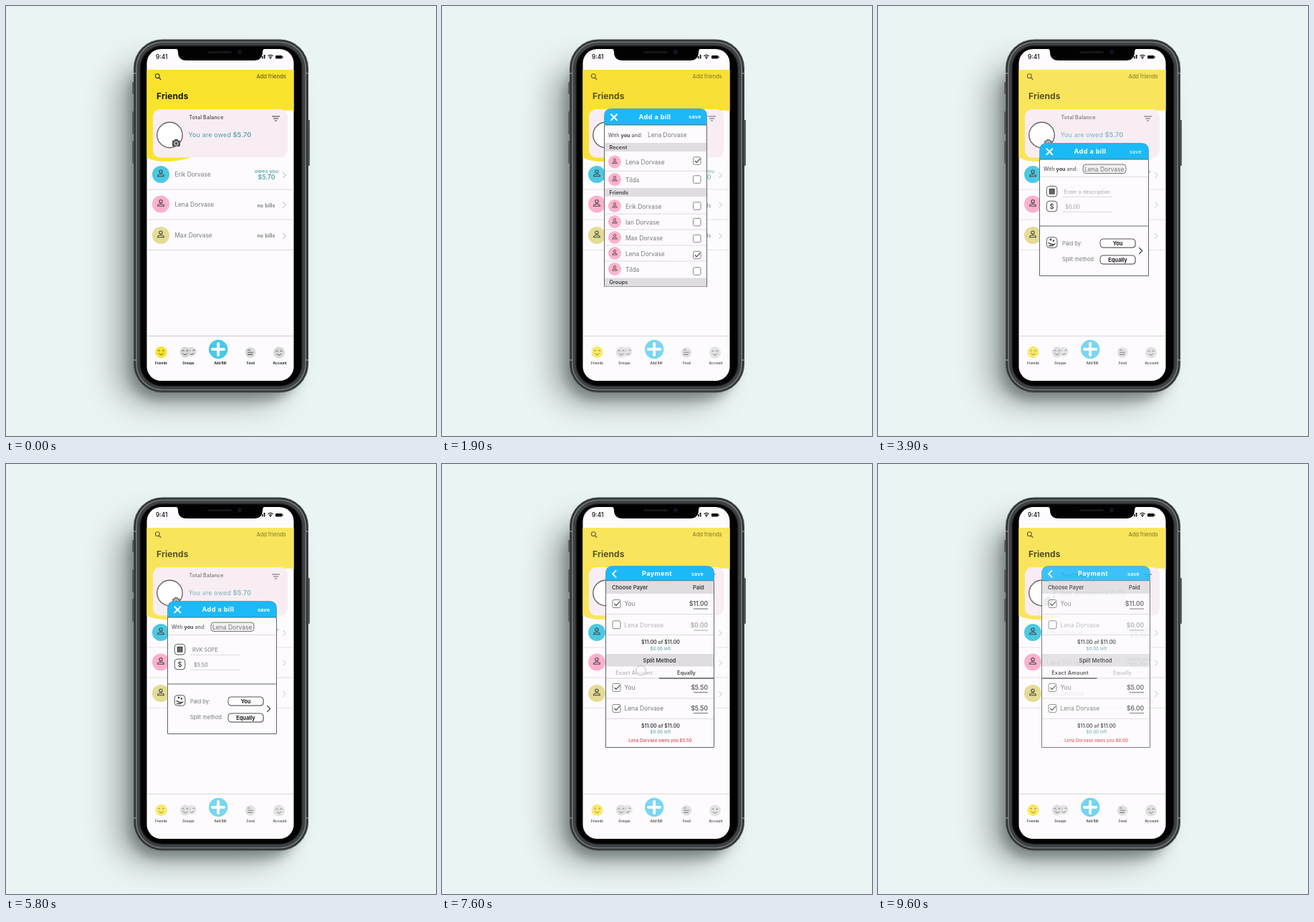
These frames come from a looping animation (600 by 600 pixels, 9700 ms). An HTML page:

```html
<!DOCTYPE html>
<html lang="en">
<head>
<meta charset="utf-8">
<title>Split a bill</title>
<style>
html, body { margin: 0; height: 100%; overflow: hidden; background: #eaf4f2; }
svg { display: block; width: 100vw; height: 100vh; font-family: Inter, sans-serif; }
.anim, .tap { animation: 9.7s linear infinite both; }
.dim { animation-name: dim; }
.sun { animation-name: sun; }
.before { animation-name: before; }
.after { animation-name: after; }
.pops { isolation: isolate; }
.pop { mix-blend-mode: plus-lighter; }
.pick { animation-name: pick; }
.bill { animation-name: bill; }
.pay { animation-name: pay; }
.checked { animation-name: checked; }
.empty { animation-name: empty; }
.typed { animation-name: typed; }
.equal { animation-name: equal; }
.exact { animation-name: exact; }
.tap { animation-name: tap; opacity: 0; }
.tap.long { animation-name: tapLong; }

@keyframes dim { 0%, 4.12% { opacity: 1 } 11.34%, 97.94% { opacity: .72 } 100% { opacity: .8 } }
@keyframes sun {
  0%, 4.12% { fill: #fae32c } 11.34%, 30.93% { fill: #f8e036 }
  38.14%, 100% { fill: #f9e55c }
}
@keyframes before { 0%, 69% { opacity: 1 } 69.01%, 100% { opacity: 0 } }
@keyframes after { 0%, 69% { opacity: 0 } 69.01%, 100% { opacity: 1 } }
@keyframes pick { 0%, 4.12% { opacity: 0 } 11.34%, 30.93% { opacity: 1 } 38.14%, 100% { opacity: 0 } }
@keyframes bill { 0%, 30.93% { opacity: 0 } 38.14%, 64.95% { opacity: 1 } 72.16%, 100% { opacity: 0 } }
@keyframes pay { 0%, 64.95% { opacity: 0 } 72.16%, 97.94% { opacity: 1 } 100% { opacity: .71 } }
@keyframes checked { 0%, 16% { opacity: 0 } 19.5%, 100% { opacity: 1 } }
@keyframes empty { 0%, 52% { opacity: 1 } 56.7%, 100% { opacity: 0 } }
@keyframes typed { 0%, 52% { opacity: 0 } 56.7%, 100% { opacity: 1 } }
@keyframes equal { 0%, 78% { opacity: 1 } 84.54%, 100% { opacity: 0 } }
@keyframes exact { 0%, 78% { opacity: 0 } 84.54%, 100% { opacity: 1 } }
@keyframes tap { 0% { opacity: 0 } 2%, 3.2% { opacity: .9 } 4.7%, 100% { opacity: 0 } }
@keyframes tapLong { 0% { opacity: 0 } 2%, 4.1% { opacity: .9 } 6.7%, 100% { opacity: 0 } }
</style>
</head>
<body>
<svg id="stage" viewBox="0 0 600 600"></svg>
<script>
const ERIK = 'Erik Dorvase', LENA = 'Lena Dorvase', MAX = 'Max Dorvase',
      IAN = 'Ian Dorvase', TILDA = 'Tilda';
const BLUE = '#1cb9f8', TEAL = '#62a9ae', PINK = '#fdb3cc', INK = '#3c3c3e', GREY = '#777';

const text = (x, y, s, size, fill = GREY, weight = 400, anchor = 'start', gap = 0) =>
  `<text x="${x}" y="${y}" font-size="${size}" fill="${fill}" font-weight="${weight}" text-anchor="${anchor}" letter-spacing="${gap}">${s}</text>`;
const mid = (x, y, s, size, fill, weight = 600, gap = 0) => text(x, y, s, size, fill, weight, 'middle', gap);
const rect = (x, y, w, h, r, fill, extra = '') =>
  `<rect x="${x}" y="${y}" width="${w}" height="${h}" rx="${r}" fill="${fill}" ${extra}/>`;
const circle = (x, y, r, fill, extra = '') => `<circle cx="${x}" cy="${y}" r="${r}" fill="${fill}" ${extra}/>`;
const path = (d, stroke, w = 1, extra = '') =>
  `<path d="${d}" fill="none" stroke="${stroke}" stroke-width="${w}" ${extra}/>`;
const rule = (x1, x2, y, stroke = '#dcdadd', w = 1) => path(`M${x1} ${y}H${x2}`, stroke, w);
const group = (cls, ...parts) => `<g class="${cls}">${parts.join('')}</g>`;
const anim = (cls, ...parts) => group('anim ' + cls, ...parts);

const person = (x, y, r, fill) => circle(x, y, r, fill) +
  `<g transform="translate(${x} ${y}) scale(${r / 12})">` +
  circle(0, -3.8, 2.2, 'none', 'stroke="#44464a" stroke-width="1.1"') +
  path('M-4.4 2.8V1.8Q-4 0 0 0T4.4 1.8V2.8Z', '#44464a', 1.1) + '</g>';
const tick = (x, y) => path(`M${x - 3} ${y}l2.4 2.4l5.2-5.6`, '#444', 1.1);
const box = (x, y, s, on) =>
  rect(x - s / 2, y - s / 2, s, s, 2, '#fff', 'stroke="#777" stroke-width=".9"') + (on ? tick(x, y) : '');
const arrow = (x, y, h, stroke, w = 1) => path(`M${x} ${y - h}l${h} ${h}l${-h} ${h}`, stroke, w);
const cross = (x, y) => path(`M${x - 4} ${y - 4}l8 8m0-8l-8 8`, '#fff', 2, 'stroke-linecap="round"');
const face = (x, y, r, fill) => circle(x, y, r, fill) +
  path(`M${x - 4.5} ${y - 1.5}q1.5-2.4 3 0m3 0q1.5-2.4 3 0M${x - 3} ${y + 1.5}q3 4.4 6 0`, '#444', .9);

function phone() {
  const key = (x, y, h) => rect(x, y, 3, h, 1, '#4a4c4e');
  const ring = (inset, fill) =>
    rect(178 + inset, 46.5 + inset, 244 - 2 * inset, 493 - 2 * inset, 40 - inset, fill);
  const rings = [[0, '#4a4d4f'], [1.2, '#2d2f31'], [3, '#76797b'], [4.6, '#3f4244'], [8.5, '#1c1d1e'], [10, '#020203']];
  return `<defs>
    <filter id="soft" x="-50%" y="-30%" width="200%" height="160%"><feGaussianBlur stdDeviation="20"/></filter>
    <filter id="near" x="-30%" y="-30%" width="160%" height="160%"><feGaussianBlur stdDeviation="8"/></filter>
    <clipPath id="glass"><rect x="196.5" y="60" width="205" height="463" rx="20"/></clipPath></defs>` +
    rect(0, 0, 600, 600, 0, '#eaf4f2') +
    rect(152, 80, 238, 477, 45, '#5d6665', 'opacity=".5" filter="url(#soft)"') +
    rect(172, 82, 236, 468, 42, '#4a5251', 'opacity=".5" filter="url(#near)"') +
    key(176.5, 106, 17) + key(176.5, 147, 32) + key(176.5, 188, 32) + key(420.8, 159, 64) +
    rings.map(([inset, fill]) => ring(inset, fill)).join('') +
    path('M178 94h4m236 0h4M178 494h4m236 0h4', '#8a8c8d', 1.5) +
    rect(196.5, 60, 205, 463, 20, '#fdfbfe');
}

function status() {
  return text(209, 74, '9:41', 8.4, '#111', 500) +
    rect(357, 70, 1.5, 3.5, 0, '#111') + rect(359.7, 68, 1.8, 5.5, 0, '#111') +
    path('M365.5 69.8q3.5-3 7 0M367 71.6q2-1.6 4 0', '#111', 1.3) + circle(369, 73, .9, '#111') +
    rect(376, 69, 9.5, 4.5, 1.2, '#111') + rect(386, 70.4, 1, 1.8, .4, '#111') +
    '<path d="M236 59H362Q358 60 358 64Q358 76 346 76H252Q240 76 240 64Q240 60 236 59Z" fill="#020203"/>' +
    rect(281, 63, 34, 3, 1.5, '#151618') + circle(326, 64.5, 3.4, '#0d0f17') + circle(326, 64.5, 1.5, '#171c2c');
}

const owes = (y, sum) => mid(363.5, y, 'owes you', 7.2, TEAL) + mid(363.5, y + 9.5, sum, 8.5, TEAL, 700);
const noBills = y => mid(363, y, 'no bills', 7.1, GREY, 600, .1);
const balance = sum => text(254.5, 183, `You are owed <tspan font-weight="700">${sum}</tspan>`, 8.8, TEAL, 500, 'start', .22);

function home() {
  const people = [[ERIK, 235, '#4cc9e2'], [LENA, 276.5, '#fcb0cb'], [MAX, 320, '#e5dc94']];
  const labels = [[216.5, 'Friends'], [254.5, 'Groups'], [299, 'Add Bill'], [341.5, 'Feed'], [382, 'Account']];
  return '<path class="anim sun" d="M196 89H402V147Q390 143 380 150L276 205Q246 217 224 217Q205 217 196 211Z"/>' +
    rect(205, 144, 188, 67.5, 10, '#f8edf3') +
    circle(228.5, 180, 17.7, '#fff', 'stroke="#666" stroke-width="1.4"') +
    anim('dim',
      circle(211.3, 97.7, 2.9, 'none', 'stroke="#333" stroke-width="1.1"'), path('M213.5 100l2.7 2.7', '#333', 1.3),
      text(349.5, 101, 'Add friends', 7.4, '#665f22', 500),
      text(210, 129.8, 'Friends', 12, '#1b1a16', 700, 'start', .1),
      rect(232, 187.5, 11, 8.5, 1.5, '#555'), rect(235, 185.8, 5, 3, 1, '#555'),
      circle(237.5, 191.8, 2.6, '#555', 'stroke="#f8edf3"'),
      text(255.5, 157.7, 'Total Balance', 7.1, '#555', 600, 'start', .15),
      path('M371 154h11M373 157h7M375 160h3', '#333', 1.2),
      anim('before', balance('$5.70'), owes(232.7, '$5.70'), noBills(280.6)),
      anim('after', balance('$11.70'), owes(232.7, '$5.70'), owes(274.5, '$6.00')),
      noBills(323),
      people.map(([name, y]) => text(235.5, y + 3.1, name, 8.4) + arrow(386.3, y + 1, 4, '#aaa')).join(''),
      [256, 298, 340.5].map(y => rule(197, 401, y)).join(''),
      rule(197, 401, 460.5, '#c9c7ca'),
      face(216.5, 483, 8, '#f8e32b'),
      face(259, 482.5, 6.8, '#dedede'), face(250, 483, 7.4, '#d6d6d6'),
      circle(296.2, 479, 13.2, '#45c8ed'), path('M288 479h16.4M296.2 470.8v16.4', '#fff', 3.8, 'stroke-linecap="round"'),
      circle(341, 483.5, 7.4, '#dadada'), path('M337 480h4M337 483.2h8M337 486.4h7', '#555', 1.1),
      face(381, 483.5, 8, '#d8d8d8'),
      labels.map(([x, s]) => mid(x, 500, s, 4.6, '#222', 700)).join('')) +
    people.map(([, y, fill]) => person(216, y, 12, fill)).join('');
}

// Window with a rounded blue title bar
function frame(x, y, w, h, head, title, tx) {
  const r = 10, top = `M${x} ${y + head}V${y + r}q0-${r} ${r}-${r}H${x + w - r}q${r} 0 ${r} ${r}V${y + head}`;
  return rect(x, y, w, h, r, '#fdfbfe') + rect(x, y + head, w, h - head, 0, '#fdfbfe') +
    `<path d="${top}Z" fill="${BLUE}"/>` +
    path(`M${x} ${y + head}V${y + h}H${x + w}V${y + head}Z`, '#626468') +
    path(top, '#3f8fae', .7) +
    mid(tx, y + head / 2 + 3.3, title, 9.1, '#fff', 700, .4);
}
const withYou = (x, y) => text(x, y, 'With <tspan font-weight="700">you</tspan> and:', 7.2, '#444');
const bar = (x, y, w, h) => rect(x, y, w, h, 0, '#dfdde0');

function picker() {
  const recent = [[LENA, 217.5, 216], [TILDA, 242, 242]];
  const friends = [[ERIK, 279, 279], [IAN, 301, 301.5], [MAX, 323, 324.5], [LENA, 345, 347.5], [TILDA, 367, 370]];
  const heads = [['Recent', 191, 12], ['Friends', 254, 12], ['Groups', 379.5, 12]];
  return anim('pop pick',
    frame(226.5, 143.5, 143, 248, 22.5, 'Add a bill', 297),
    cross(240, 155.3), mid(353, 157.3, 'save', 7.3, '#fff', 600, .2), withYou(232, 182.5),
    heads.map(([s, y, h]) => bar(227, y, 142, h) + text(233.5, y + 8.6, s, 7.2, INK, 600, 'start', .1)).join(''),
    [230.3, 290, 312, 334, 356].map(y => rule(227, 369, y)).join(''),
    [...recent, ...friends].map(([s, y, c]) =>
      person(241, y, 9, PINK) + text(256, y + 3.6, s, 8.4) + box(355.8, c, 10.5)).join(''),
    anim('checked', text(287, 182.7, LENA, 8.4), tick(355.8, 216), tick(355.8, 347.5)));
}

function billForm() {
  const icon = y => rect(235.3, y - 7.3, 14.6, 14.6, 4, '#fff', 'stroke="#555"');
  const button = (y, s) => rect(311, y - 5, 49, 12, 4, '#c9c9cb') +
    rect(310, y - 6, 49, 12, 4, '#fff', 'stroke="#555"') + mid(334.5, y + 2.7, s, 7.4, '#222', 700);
  return anim('pop bill',
    frame(225.5, 191.5, 152, 185, 22.5, 'Add a bill', 296),
    cross(239.3, 203.2), withYou(231, 229.5),
    rect(286, 221, 60, 12.5, 4, '#f1eff2', 'stroke="#777"'), text(288, 230.5, LENA, 8.5),
    rule(226, 377, 238.5), rule(226, 377, 307, '#626468'),
    icon(258.7), icon(279.5), icon(330),
    rect(238.7, 254.8, 7.8, 8, .5, '#444'), path('M240 257h5M240 259h5M240 261h5', '#ccc', .5),
    mid(242.6, 283, '$', 9.5, '#333', 500),
    circle(241, 326, 1.4, '#444'), circle(245, 327.5, 1.3, '#444'),
    path('M237.5 331h2l2 1.5h3.5M238 334.5h5l4.5-3', '#444', 1.3),
    rule(257, 327, 266.3), rule(257, 327, 287.3),
    anim('empty', text(259.5, 262, 'Enter a description', 7.3, '#aaa'), text(261.5, 283, '$0.00', 7.3, '#999'),
      mid(359.5, 205.6, 'save', 7.3, '#fff', 400, .2)),
    anim('typed', text(260, 262, 'RVK SOPE', 7.3, GREY), text(262, 283, '$5.50', 7.3, GREY),
      mid(359.5, 205.6, 'save', 7.3, '#fff', 700, .1)),
    text(257, 333.5, 'Paid by:', 7.4), text(257, 355.6, 'Split method:', 7.4),
    button(331, 'You'), button(354, 'Equally'), arrow(364.2, 341.5, 4.5, '#444', 1.2));
}

function payment() {
  const sum = (y, s, fill) => text(371, y, s, 8.4, fill, 600, 'end') + rule(351, 371, y + 3.7, fill, .9);
  const line = (y, on, name, fill = GREY) => box(243.5, y, 11, on) + text(254.5, y + 3.3, name, 8.4, fill);
  const total = y => mid(305, y, '$11.00 of $11.00', 7, INK, 600) + mid(305, y + 8.5, '$0.00 left', 5.8, TEAL, 500, .2);
  const split = (cls, mine, theirs, left, [a, b]) => anim(cls,
    mid(268, 293.7, 'Exact Amount', 7.3, a, 600, .2), mid(341, 293.7, 'Equally', 7.3, b),
    rule(left, left + 76.5, 299, '#555', 1.6),
    sum(315, mine, '#555'), sum(344, theirs, '#555'),
    mid(304.5, 387.7, `${LENA} owes you ${theirs}`, 5.9, '#dc5054', 600, .1));
  return anim('pop pay',
    frame(228.5, 142.5, 151, 253, 20.5, 'Payment', 300),
    path('M243 148.3l-4.8 5l4.8 5', '#fff', 1.8), mid(356.5, 155.5, 'save', 7.2, '#fff', 600, .2),
    bar(229, 163.5, 150, 17.5), text(237, 175, 'Choose Payer', 7.5, INK, 600), text(350, 175, 'Paid', 7.5, INK, 600),
    line(195, true, 'You'), sum(198.4, '$11.00', '#555'),
    line(224.3, false, LENA, '#b5b5b5'), sum(228.4, '$0.00', '#a5a5a5'), total(251),
    bar(229, 265, 150, 17.5), mid(303.5, 276.7, 'Split Method', 7.5, INK),
    line(312, true, 'You'), line(341, true, LENA), total(367.5),
    [209.5, 238.5, 299, 327, 355.5].map(y => rule(229, 379, y)).join(''),
    split('equal', '$5.50', '$5.50', 303, ['#bbb', INK]),
    split('exact', '$5.00', '$6.00', 229, [INK, '#bbb']));
}

// Taps: x, y, start in seconds, hold style
const taps = [[296, 479, .2], [356, 216, 1.2, 'long'], [353, 155, 2.8], [300.5, 259.5, 4.7, 'long'],
  [366, 341, 6.1], [277.5, 288, 7.3], [356, 153, 8.7, 'long']];

document.getElementById('stage').innerHTML = phone() +
  `<g clip-path="url(#glass)">${home()}${status()}</g>` +
  group('pops', picker(), billForm(), payment()) +
  taps.map(([x, y, at, hold = '']) =>
    circle(x, y, 6.8, '#fff', `fill-opacity=".55" stroke="#b5b3b6" class="tap ${hold}" style="animation-delay:${at}s"`)).join('');
</script>
</body>
</html>
```
